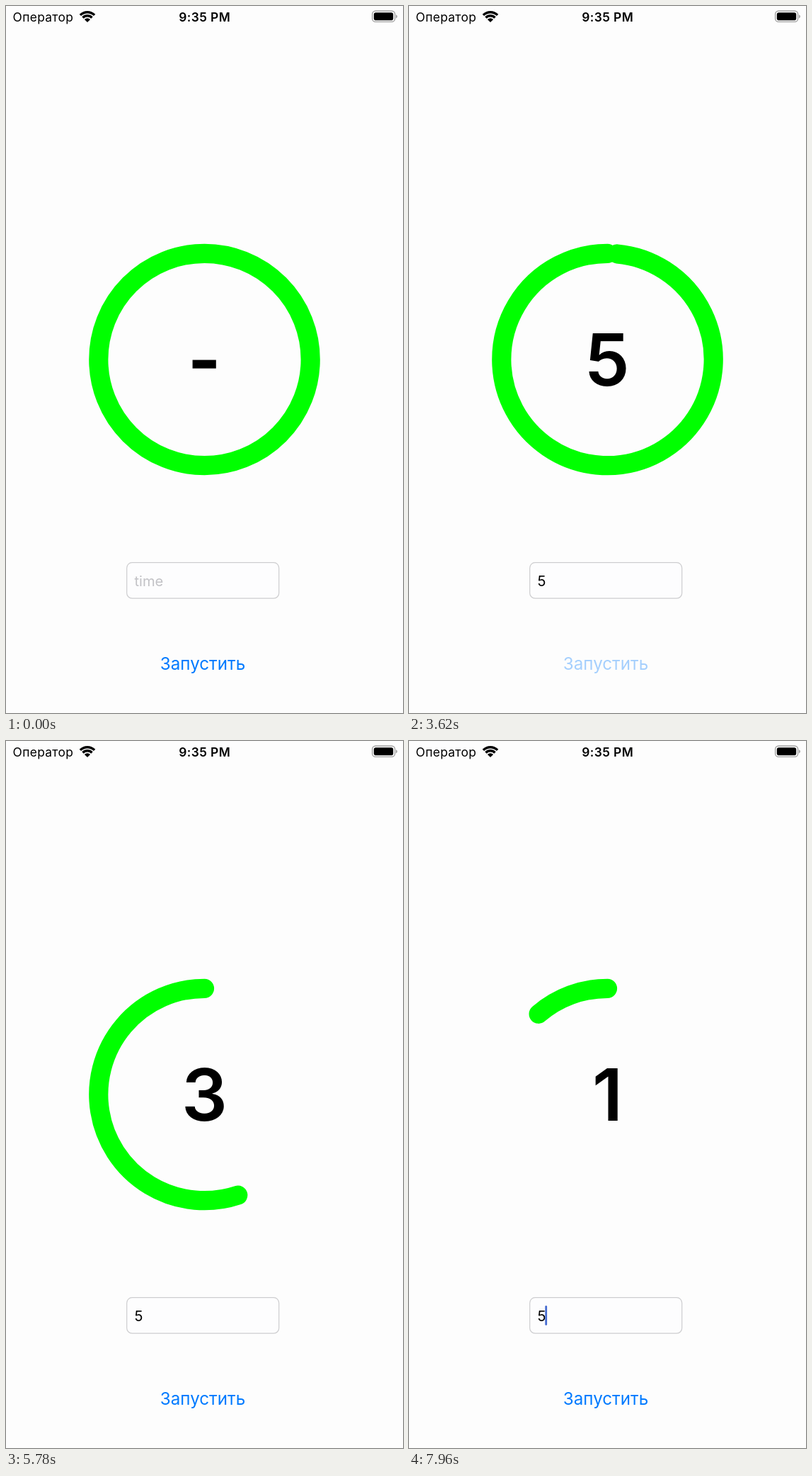
These frames come from a looping animation (561 by 998 pixels, 7.99 s). An HTML page:

```html
<!DOCTYPE html>
<html lang="ru">
<head>
<meta charset="utf-8">
<title>Timer</title>
<style>
  html, body { margin: 0; width: 100%; height: 100%; overflow: hidden; background: #fdfdfd; }
  svg { display: block; width: 100vw; height: 100vh; }
  text { font-family: Inter, Roboto, sans-serif; }
  .middle { text-anchor: middle; }
</style>
</head>
<body>
<svg viewBox="0 0 561 998">
  <rect width="561" height="998" fill="#fdfdfd"/>

  <!-- status bar -->
  <text x="9.6" y="21.6" font-size="17.4" letter-spacing=".3">Оператор</text>
  <g fill="none" stroke="#000" stroke-width="3.4">
    <path d="M104.9 12.9A14.3 14.3 0 0 1 125.1 12.9"/>
    <path d="M108.5 16.5A9.2 9.2 0 0 1 121.5 16.5"/>
  </g>
  <path d="M115 23L110.9 18.9A5.8 5.8 0 0 1 119.1 18.9Z"/>
  <text class="middle" x="280.7" y="21.6" font-size="17.4" font-weight="600" letter-spacing=".4">9:35 PM</text>
  <rect x="517.6" y="7" width="32" height="15.4" rx="4.6" fill="none" stroke="#a2a2a2" stroke-width="1.4"/>
  <rect x="519.8" y="9.2" width="27.4" height="11" rx="2.8"/>
  <path d="M551 12.2Q553 13 553 14.8T551 17.4Z" fill="#a2a2a2"/>

  <!-- timer -->
  <path id="ring" fill="none" stroke="#0f0" stroke-width="27.2" stroke-linecap="round"/>
  <rect id="dash" x="263.6" y="499.6" width="33.2" height="12"/>
  <text id="count" class="middle" x="280.5" y="536" font-size="102" font-weight="600"></text>

  <!-- input and button -->
  <rect x="170.7" y="785.7" width="215" height="50.5" rx="7.5" fill="#fdfdfe" stroke="#cdcdcf" stroke-width="1.2"/>
  <text id="value" x="181.4" y="818.8" font-size="20.2"></text>
  <rect id="caret" y="797" width="2.8" height="28" rx="1.4" fill="#456bd0"/>
  <text id="button" class="middle" x="278" y="936.6" font-size="24.2" fill="#007aff">Запустить</text>
</svg>

<script>
const LOOP = 7990;
const FOCUS = 500, TYPED = 2140, PRESS = 3290, START = 3549;
const CENTER = { x: 280.5, y: 499 }, RADIUS = 149.7;
const DEGREES_PER_MS = 0.0724;
const BLINK = 995, BLINK_ORIGIN = 2970;

const $ = id => document.getElementById(id);
const [ring, dash, count, value, caret, button] =
  ['ring', 'dash', 'count', 'value', 'caret', 'button'].map($);

const ramp = (t, from, to) => Math.min(1, Math.max(0, (t - from) / (to - from)));

function ringPath(degrees) {
  const a = degrees * Math.PI / 180;
  const { x, y } = CENTER;
  const top = `${x} ${y - RADIUS}`;
  const arc = (large, end) => `A${RADIUS} ${RADIUS} 0 ${large} 1 ${end}`;
  if (degrees <= 0) return `M${top}${arc(0, `${x} ${y + RADIUS}`)}${arc(0, top)}Z`;
  const tip = `${x + RADIUS * Math.sin(a)} ${y - RADIUS * Math.cos(a)}`;
  return `M${tip}${arc(degrees < 180 ? 1 : 0, top)}`;
}

function caretOpacity(t) {
  if (t < FOCUS) return 0;
  if (t < 2100) return 1 - ramp(t, 1120, 1270) + ramp(t, 1640, 1860);
  if (t < TYPED) return 0.8;
  if (t < BLINK_ORIGIN - BLINK / 2) return 1;
  const phase = ((t - BLINK_ORIGIN) / BLINK % 1 + 1) % 1;
  return 1 - ramp(phase, 0.5, 0.65) + ramp(phase, 0.85, 1);
}

function draw(t) {
  const running = t >= START;
  const typed = t >= TYPED;

  ring.setAttribute('d', ringPath((t - START) * DEGREES_PER_MS));
  dash.setAttribute('visibility', running ? 'hidden' : 'visible');
  count.textContent = running ? 5 - Math.floor((t - START) / 1000) : '';

  value.textContent = typed ? '5' : 'time';
  value.setAttribute('fill', typed ? '#000' : '#c2c2c6');
  caret.setAttribute('x', typed ? 192.3 : 180.6);
  caret.setAttribute('opacity', caretOpacity(t));

  const pressed = ramp(t, PRESS - 30, PRESS + 170) - ramp(t, START, START + 400);
  button.setAttribute('opacity', 1 - 0.8 * pressed);
}

const begin = performance.now();
function tick() {
  draw((performance.now() - begin) % LOOP);
  requestAnimationFrame(tick);
}
tick();
</script>
</body>
</html>
```
